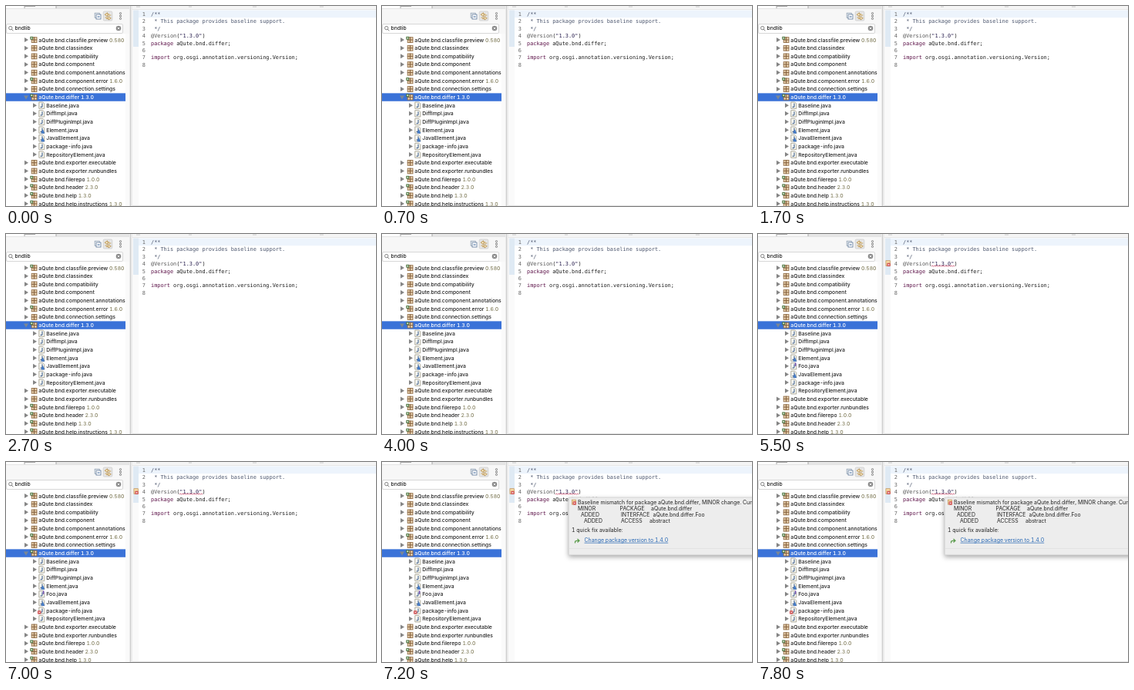
An HTML page for the animation above (8 s loop, 480 by 260 pixels).

```html
<!DOCTYPE html>
<html lang="en">
<head>
<meta charset="utf-8">
<style>
html, body { margin: 0; width: 100%; height: 100%; overflow: hidden; background: #fff; }
svg { display: block; width: 480px; height: 260px; }
text { font: 500 6.8px Inter, "Noto Sans", sans-serif; font-variant-numeric: tabular-nums; fill: #222; white-space: pre; }
.code text { font: 6.9px "DejaVu Sans Mono", monospace; fill: #1c1c1c; }
.version { fill: #85805f; }
.selected text, .selected .version { fill: #fff; }
.code .doc { fill: #4c566e; }
.code .keyword { fill: #5c1248; }
.code .string { fill: #29204f; }
.code .annotation { fill: #555; }
.code .number { fill: #666; text-anchor: end; }
.tip text { font-size: 6.95px; font-weight: 400; }
.tip .link { fill: #2868b4; text-decoration: underline; }
</style>
</head>
<body>
<svg id="stage" viewBox="0 0 480 260"></svg>
<script>
const LOOP = 8000, FOO = 4600, MARKER = 5100, FILE_ERROR = 5600, TOOLTIP = 7200;
const ROW = 10.65, FIRST_ROW = 44, LINE = 9.4, FIRST_LINE = 10.5;

const rect = (x, y, w, h, fill, extra = '') =>
  `<rect x="${x}" y="${y}" width="${w}" height="${h}" fill="${fill}" ${extra}/>`;
const path = (d, stroke, width = 1, fill = 'none') =>
  `<path d="${d}" stroke="${stroke}" stroke-width="${width}" fill="${fill}"/>`;
const text = (x, y, s, cls = '') => `<text x="${x}" y="${y}" class="${cls}">${s}</text>`;
const span = (cls, s) => `<tspan class="${cls}">${s}</tspan>`;
const group = (body, attrs = '') => `<g ${attrs}>${body}</g>`;
const at = (x, y, body) => group(body, `transform="translate(${x} ${y})"`);
const from = (time, body) => group(body, `data-from="${time}"`);

const errorBadge = rect(-2.2, -2.2, 4.4, 4.4, '#cf4a4c', 'rx="0.8"') +
  path('M-1.1-1.1L1.1 1.1M1.1-1.1L-1.1 1.1', '#fff', 0.8);

const arrow = (x, open) => at(x, 0, open
  ? path('M-3-2H3L0 3Z', 'none', 0, '#7b8794')
  : path('M-2-3L3 0L-2 3Z', 'none', 0, '#858585'));

const packageIcon = exported => at(36.5, 0,
  rect(-3.3, -3.3, 6.8, 6.8, '#e2cba9', 'stroke="#94704a" stroke-width="0.9"') +
  path('M0-3.7V3.7M-3.7 0H3.7', '#845f3c', 1) +
  (exported ? rect(-5.2, -4.2, 3.8, 3.8, '#48723c') + rect(-4.2, -3.2, 1.8, 1.8, '#dfe9d8') : ''));

const fileIcon = kind => at(46, 0,
  path('M-3.2-4.2H1.8L3.8-2.2V4.2H-3.2Z', '#8f8a78', 0.7, '#fbfaf2') +
  path('M1-2.6V1.2Q1 2.6-1.4 2', '#3c5c8c', 1.1) +
  (kind === 'abstract' ? path('M-.2 4.2L1.8-.2L3.8 4.2Z', '#2860b4', 0.6, '#4a83d0') : '') +
  (kind === 'interface' ? path('M2.6-4.5V0', '#7654b4', 1.6) : ''));

const packageRow = (name, version) => arrow(26, false) + packageIcon(version) +
  text(42.3, 2.5, 'aQute.bnd.' + name + (version ? span('version', ' ' + version) : ''));
const fileRow = (name, kind) => arrow(37, false) + fileIcon(kind) + text(52.3, 2.5, name + '.java');
const selectedRow = group(rect(0, -5.2, 155, 10.4, '#3a72d8') + arrow(26, true) +
  packageIcon(true) + text(42.3, 2.5, 'aQute.bnd.differ' + span('version', ' 1.3.0')), 'class="selected"');

const placeRows = (rows, start) =>
  rows.map((row, i) => at(0, FIRST_ROW + (start + i) * ROW, row)).join('');

const upperRows = [
  packageRow('classfile.preview', '0.580'),
  packageRow('classindex'),
  packageRow('compatibility'),
  packageRow('component'),
  packageRow('component.annotations'),
  packageRow('component.error', '1.6.0'),
  packageRow('connection.settings'),
  selectedRow,
  fileRow('Baseline'), fileRow('DiffImpl'), fileRow('DiffPluginImpl'), fileRow('Element', 'abstract')
];
const lowerRows = [
  fileRow('JavaElement', 'abstract'),
  fileRow('package-info') + from(FILE_ERROR, at(43.2, 2.4, errorBadge)),
  fileRow('RepositoryElement'),
  packageRow('exporter.executable'),
  packageRow('exporter.runbundles'),
  packageRow('filerepo', '1.0.0'),
  packageRow('header', '2.3.0'),
  packageRow('help', '1.3.0'),
  packageRow('help.instructions', '1.3.0')
];

const tree = group(
  placeRows(upperRows, 0) +
  from(FOO, placeRows([fileRow('Foo', 'interface')], upperRows.length)) +
  group(placeRows(lowerRows, upperRows.length), 'id="lower"'),
  'clip-path="url(#treeClip)"');

const toolbar =
  rect(0, 0, 162, 36, '#f7f7f7') +
  rect(0, 0, 24, 3, '#fff') + rect(65, 0, 96, 3, '#e6e6e6') +
  path('M0 3.5H162', '#e4e4e4') + path('M24 .5H38M24 0V3M65 0V3', '#a8a8a8') +
  at(119, 13, rect(-3.8, -3.8, 6, 6, '#fff', 'stroke="#8799ae" stroke-width="0.8"') +
    rect(-2, -2, 6, 6, '#fff', 'stroke="#5c7798" stroke-width="0.8"') + path('M-.4 1H2.6', '#335e94')) +
  at(132, 13, rect(-5.8, -6, 11.6, 12, '#e6e6e6', 'rx="1.5" stroke="#c8c8c8" stroke-width="0.7"') +
    path('M4.3-1H-.5V.6L-4-1.8L-.5-4.2V-2.6H2M-3.5 2H1V.6L4.3 2.8L1 5V3.6H-2', '#b58d48', 0.8, '#f3e3bd')) +
  [9.6, 13, 16.4].map(y => `<circle cx="148.5" cy="${y}" r="1.1" fill="#fff" stroke="#555" stroke-width="0.7"/>`).join('') +
  rect(0.5, 23.5, 151, 12, '#fff', 'rx="1.5" stroke="#cfcfcf" stroke-width="0.8"') +
  '<circle cx="5.8" cy="28.6" r="2.2" fill="none" stroke="#666" stroke-width="0.8"/>' +
  path('M7.4 30.2L9.4 32.3', '#666', 0.9) +
  text(11.5, 31.3, 'bndlib') +
  '<circle cx="146" cy="29" r="3.3" fill="#8b8b8b"/>' +
  path('M144.7 27.7L147.3 30.3M147.3 27.7L144.7 30.3', '#fff', 0.8);

const lines = [
  span('doc', '/**'),
  span('doc', ' * This package provides baseline support.'),
  span('doc', ' */'),
  span('annotation', '@Version') + '(' + span('string', '"1.3.0"') + ')',
  span('keyword', 'package') + ' aQute.bnd.differ;',
  '',
  span('keyword', 'import') + ' org.osgi.annotation.versioning.Version;',
  ''
];
const squiggle = 'M225 42.2' + 'l1.25-1.2l1.25 1.2'.repeat(12);

const editor =
  rect(155, 36, 6, 224, '#fafafa') + rect(160, 0, 4, 260, '#ececec') + path('M161.5 0V260', '#cecece') +
  rect(164, 0, 316, 5, '#f5f5f5') + path('M164 4.5H480', '#e8e8e8') +
  path('M169 1H174M237 1H241M320 1H325M407 1H412', '#c9c9c9') +
  rect(164, 5, 8, 255, '#fafafa') + rect(165, 5.5, 7, 47.5, '#dfeaf4') +
  rect(172, 5.5, 308, 9.6, '#edf4fc') +
  lines.map((line, i) => {
    const y = FIRST_LINE + i * LINE + 2.5;
    return text(181, y, i + 1, 'number') + text(188, y, line);
  }).join('') +
  path('M164 259.5H480', '#e5e5e5') +
  from(MARKER, path(squiggle, '#c4375a', 0.8) +
    at(168.5, 38.5, rect(-2.6, -3.8, 5.6, 6.8, '#f4d7a2', 'stroke="#b98748" stroke-width="0.6"') +
      at(1, 1.4, errorBadge)));

const tipTable = [
  [[254, 'MINOR'], [308.5, 'PACKAGE'], [349, 'aQute.bnd.differ']],
  [[258, 'ADDED'], [310, 'INTERFACE'], [351.5, 'aQute.bnd.differ.Foo']],
  [[262, 'ADDED'], [310, 'ACCESS'], [347, 'abstract']]
];
const tooltip = from(TOOLTIP, group(
  rect(242, 46, 250, 75, '#ededed', 'filter="url(#shadow)"') +
  path('M480 46.2H242.2V120.8H480', '#c6c6c6', 0.6) +
  at(249, 52.5, rect(-2.4, -3.4, 5, 6, '#f4d7a2', 'stroke="#b98748" stroke-width="0.6"') + at(0.8, 1, errorBadge)) +
  text(254, 54.7, 'Baseline mismatch for package aQute.bnd.differ, MINOR change. Current') +
  tipTable.map((cells, i) => cells.map(([x, s]) => text(x, 63 + i * 8.2, s)).join('')).join('') +
  text(246, 91, '1 quick fix available:') +
  path('M250.5 105.5V104Q250.5 102.3 253 102.3H255.5M253.5 100L256 102.3L253.5 104.6', '#5a9b4b', 1.2) +
  text(262.5, 103.8, 'Change package version to 1.4.0', 'link') +
  path('M243 112.5H480', '#dedede', 0.7), 'class="tip"'));

const stage = document.getElementById('stage');
stage.innerHTML = `<defs><clipPath id="treeClip"><path d="M0 36H155V260H0Z"/></clipPath>
  <filter id="shadow" x="-10%" y="-20%" width="120%" height="150%">
  <feDropShadow dx="0" dy="2.5" stdDeviation="3" flood-color="#000" flood-opacity="0.35"/></filter></defs>` +
  rect(0, 0, 480, 260, '#fff') + toolbar + tree + group(editor, 'class="code"') + tooltip;

const timed = [...stage.querySelectorAll('[data-from]')];
const lower = document.getElementById('lower');

function render(now) {
  const time = now % LOOP;
  for (const part of timed) part.style.display = time >= part.dataset.from ? '' : 'none';
  lower.setAttribute('transform', `translate(0 ${time >= FOO ? ROW : 0})`);
  requestAnimationFrame(render);
}
render(performance.now());
</script>
</body>
</html>
```
